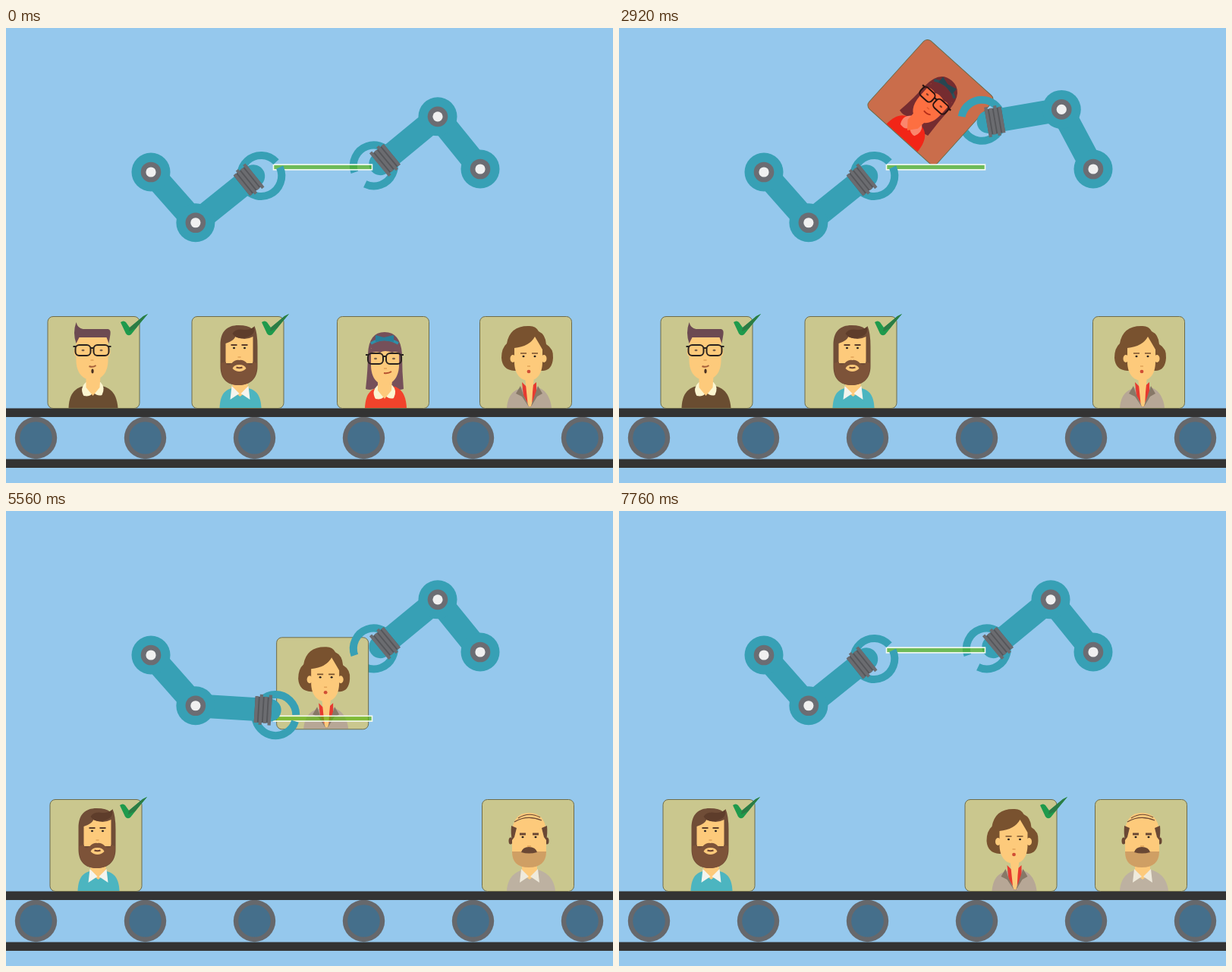
Recreate the animation shown at these times as an HTML page with a canvas. Size 800x600 px, loop 7.92 s.

```html
<!DOCTYPE html>
<html lang="en">
<head>
<meta charset="utf-8">
<title>Sorting belt</title>
<style>
html, body { margin: 0; width: 100%; height: 100%; overflow: hidden; background: #95c8ed; }
canvas { display: block; width: 800px; height: 600px; }
</style>
</head>
<body>
<canvas id="stage" width="800" height="600"></canvas>
<script>
const ctx = document.getElementById('stage').getContext('2d');
const LOOP = 7920, STEP = 40, RAD = Math.PI / 180;
const TEAL = '#37a0b5', SKIN = '#fdca7b', DARK = '#29221f', CREAM = '#fbf5d0';

const lerp = (a, b, p) => a + (b - a) * p;
const clamp = x => Math.max(0, Math.min(1, x));
const span = (t, a, b) => clamp((t - a) / (b - a));
const ease = (t, a, b) => (1 - Math.cos(Math.PI * span(t, a, b))) / 2;
const polar = (o, deg, r) => ({ x: o.x + r * Math.cos(deg * RAD), y: o.y + r * Math.sin(deg * RAD) });

// ---- drawing helpers ----
function fill(color, d) {
  ctx.fillStyle = color;
  ctx.fill(new Path2D(d));
}
function line(color, width, d) {
  ctx.strokeStyle = color;
  ctx.lineWidth = width;
  ctx.stroke(new Path2D(d));
}
function oval(color, x, y, rx, ry = rx) {
  ctx.fillStyle = color;
  ctx.beginPath();
  ctx.ellipse(x, y, rx, ry, 0, 0, 7);
  ctx.fill();
}
function at(x, y, deg, draw) {
  ctx.save();
  ctx.translate(x, y);
  ctx.rotate(deg * RAD);
  draw();
  ctx.restore();
}

// ---- faces, in card coordinates from the top left corner ----
function glasses(x, y) {
  ctx.strokeStyle = DARK;
  ctx.lineWidth = 2;
  for (const dx of [0, 24]) {
    oval('#7a6248', x + dx + 10, y + 7, 2, 1.2);
    ctx.beginPath();
    ctx.roundRect(x + dx, y, 20, 14, 5);
    ctx.stroke();
  }
  line(DARK, 2.2, `M${x + 20} ${y + 4}h4M${x - 3} ${y + 2}h4M${x + 43} ${y + 2}h4`);
}
function eyes(color, l, r, y, w = 2) {
  line(color, w, `M${l - 4} ${y - 3}h8M${r - 4} ${y - 3}h8`);
  oval(DARK, l, y + 1, 1.5, 1.2);
  oval(DARK, r, y + 1, 1.5, 1.2);
}
function collar(color, x, y) {
  fill(SKIN, `M${x - 10} ${y - 8}h20v12l-10 8l-10 -8Z`);
  fill(color, `M${x - 11} ${y - 2}l-2 18l12 -8ZM${x + 11} ${y - 2}l2 18l-12 -8Z`);
}
function roundCollar(x, y) {
  fill(CREAM, `M${x - 9} ${y - 4}q-9 8 -3 18q10 2 12 -5q6 6 12 4q5 -10 -2 -17Z`);
  fill(SKIN, `M${x - 9} ${y - 12}h19l-1 15l-9 11l-9 -11Z`);
}

function spikyMan() {
  fill('#6a4d31', 'M28 121C29 98 40 91 60 91S91 98 93 121Z');
  roundCollar(60, 91);
  oval(SKIN, 38, 47, 3, 6);
  oval(SKIN, 80, 47, 3, 6);
  fill(SKIN, 'M38 24H80V58C80 74 72 84 59 84S38 74 38 58Z');
  fill('#6c4a52', 'M38 8Q40 16 47 17H80Q84 18 83 24L81 36L78 28H42L38 36Q33 22 38 8Z');
  glasses(37, 38);
  line('#e0a257', 1.5, 'M57 58h4');
  line('#a5603a', 2, 'M55 66q5 2 9 -1');
  oval('#4a3021', 59.5, 72.5, 1.6, 3);
}
function beardedMan() {
  fill('#4cb5c0', 'M37 121C38 100 46 94 64 94S91 100 92 121Z');
  collar('#f4f4ee', 64, 94);
  fill('#704d37', 'M38 38C38 20 47 12 62 12Q75 12 80 17L83 13Q87 22 87 40V66C87 82 78 91 62 91S38 82 38 66Z');
  fill(SKIN, 'M45 36Q55 33 58 27Q70 33 81 27V62H45Z');
  fill('#7d5339', 'M39 62L45 60Q47 68 53 62Q58 57 63 58Q68 57 73 62Q79 68 81 60L86 62V66C86 82 77 91 62 91S39 82 39 66Z');
  fill('#5e3d2b', 'M54 23Q58 16 70 18Q78 18 82 14Q85 24 73 28Q60 32 54 23Z');
  eyes('#5e3d2b', 56, 70, 41);
  line('#e0a257', 1.5, 'M61 54h4');
  fill(SKIN, 'M54 69Q56 64 63 64Q70 64 72 69Q68 73 63 73Q58 73 54 69Z');
  line('#6b4030', 2, 'M59 67.5q4 1.5 8 0');
}
function girl() {
  fill('#75505a', 'M38 96Q41 70 41 50Q42 21 63 21Q84 21 86 50Q86 72 88 96Q78 99 72 92H54Q48 99 38 96Z');
  fill('#f2432b', 'M37 121C38 100 46 94 64 92S91 100 92 121Z');
  roundCollar(63, 95);
  fill(SKIN, 'M45 42H82V64C82 80 74 90 63 90S45 80 45 64Z');
  fill('#75505a', 'M43 50Q46 32 63 32Q82 32 84 50Q78 45 73 48Q63 44 57 48Q50 45 43 50Z');
  line('#2f8fa8', 3.5, 'M45 36Q63 25 81 36');
  fill('#277f9a', 'M51 25L62 28L75 25V34L62 32L51 34Z');
  glasses(41, 49);
  line('#e0a257', 1.5, 'M62 69h4');
  line('#b5522f', 1.8, 'M62 75q6 1 10 -2');
}
function bobWoman() {
  fill('#79522f', 'M36 36Q40 13 64 13Q74 12 78 20Q87 24 88 37Q98 43 97 55Q96 71 84 72H46Q30 71 29 55Q29 42 36 36Z');
  fill('#b7a796', 'M36 121C38 100 48 95 65 93S93 102 95 121Z');
  fill('#e63a30', 'M56 87L65 96L75 87V105L66 119L58 105Z');
  fill(SKIN, 'M60 80H72L70 100L69 119H64L62 100Z');
  fill('#877867', 'M54 92L48 102L56 106L66 121L58 104ZM77 92L83 102L76 106L67 121L73 104Z');
  oval(SKIN, 44, 56, 3.5, 5);
  oval(SKIN, 85, 56, 3.5, 5);
  fill(SKIN, 'M46 42Q66 40 73 27Q79 37 83 44V60C83 76 76 85 65 85S46 76 46 60Z');
  eyes('#79522f', 58, 73, 52, 1.7);
  line('#e0a257', 1.5, 'M63 66h4');
  oval('#d04e35', 65, 73, 2.4, 2.2);
}
function baldMan() {
  fill('#bdb1a1', 'M33 121C34 102 46 92 64 92S95 102 97 121Z');
  collar('#efeadc', 63, 94);
  oval('#6a4834', 38, 55, 2.5, 4.5);
  oval('#6a4834', 86, 55, 2.5, 4.5);
  fill(SKIN, 'M40 42Q42 18 62 18Q83 18 85 42V66C85 82 77 90 62 90S40 82 40 66Z');
  fill('#6a4834', 'M39 35L46 38L43 50L40 54Q38 46 39 35ZM86 35L79 38L82 50L85 54Q87 46 86 35Z');
  fill('#cf9f64', 'M40 69H85C85 83 77 90 62 90S40 83 40 69Z');
  line('#6a4834', 1.2, 'M43 30Q60 20 79 28M48 25Q62 16 77 24');
  eyes('#6a4834', 54, 71, 49, 3);
  line('#e0a257', 1.5, 'M60 62h5');
  fill('#6a4834', 'M52 70Q54 63 62 63Q71 63 73 70Q62 73 52 70Z');
}

// ---- stage parts ----
function check(x, y, size = 1) {
  if (!size) return;
  ctx.save();
  ctx.translate(x + 10, y + 20);
  ctx.scale(size, size);
  ctx.translate(-10, -20);
  fill('#1f9a4c', 'M0 10Q4 7 7 10L12 17L30 2L36 -1Q25 12 14 26Q10 29 7 25Z');
  fill('#2c7c45', 'M12 17L30 2L36 -1Q28 8 20 18L11 22Z');
  ctx.restore();
}
// x, y is the card centre
function card(x, y, face, deg = 0, tint = 0) {
  at(x, y, deg, () => {
    ctx.translate(-61, -61);
    ctx.beginPath();
    ctx.roundRect(0.5, 0.5, 121, 121, 7);
    ctx.fillStyle = '#cac78e';
    ctx.fill();
    face();
    ctx.beginPath();
    ctx.roundRect(0.5, 0.5, 121, 121, 7);
    if (tint) {
      ctx.globalCompositeOperation = 'multiply';
      ctx.fillStyle = `rgba(255,140,134,${tint})`;
      ctx.fill();
      ctx.globalCompositeOperation = 'source-over';
    }
    ctx.strokeStyle = '#6d6b4a';
    ctx.lineWidth = 1;
    ctx.stroke();
  });
}
function belt(shift) {
  for (let x = 39.5 - shift % 144; x < 840; x += 144) {
    oval('#66686c', x, 540.5, 27.7);
    oval('#456f8b', x, 540.5, 21.3);
  }
  ctx.fillStyle = '#333';
  ctx.fillRect(0, 501.5, 800, 11.5);
  ctx.fillRect(0, 568.5, 800, 11.5);
}
// The claw sits a little to one side of the forearm axis.
function pose(shoulder, a, b, side) {
  const elbow = polar(shoulder, a, 89);
  const wrist = polar(elbow, b, 89);
  const claw = polar(polar(wrist, b, 17), b + 90, side);
  return { shoulder, elbow, wrist, claw, b };
}
function jaw(arm, gap, side) {
  at(arm.claw.x, arm.claw.y, arm.b, () => {
    ctx.strokeStyle = TEAL;
    ctx.lineWidth = 10;
    ctx.beginPath();
    ctx.arc(0, 0, 27, side * gap * RAD, side * Math.PI, side < 0);
    ctx.stroke();
  });
}
function arm(a) {
  line(TEAL, 31, `M${a.shoulder.x} ${a.shoulder.y}L${a.elbow.x} ${a.elbow.y}L${a.wrist.x} ${a.wrist.y}`);
  for (const j of [a.shoulder, a.elbow]) {
    oval(TEAL, j.x, j.y, 25.5);
    oval('#6b6d73', j.x, j.y, 13.3);
    oval('#f0f0f0', j.x, j.y, 6.6);
  }
  at(a.wrist.x, a.wrist.y, a.b, () => {
    oval(TEAL, 9, 0, 15);
    ctx.fillStyle = '#55565a';
    ctx.fillRect(-11, -17, 22, 34);
    ctx.fillStyle = '#6b6c70';
    for (let i = 0; i < 4; i++) {
      const h = i % 2 ? 20 : 17.5;
      ctx.fillRect(-11 + i * 6, -h, 4.2, 2 * h);
    }
  });
}
function bar(y) {
  ctx.fillStyle = 'rgba(90,180,10,.65)';
  ctx.fillRect(353, y - 3, 129, 6);
  ctx.strokeStyle = '#f6fbf0';
  ctx.lineWidth = 1.6;
  ctx.strokeRect(352.5, y - 3.4, 130, 6.8);
}

// ---- motion ----
const RIGHT = { x: 625, y: 186 }, LEFT = { x: 191, y: 190 };
const HOME = [231, 140.5], DOWN = [125, 120], FLING = [246.4, 182];
const HELD = { x: -67.7, y: 45.9 };
const MOVES = [
  [40, 780, DOWN], [820, 1480, HOME],
  [2480, 3000, FLING, true], [3000, 3600, HOME],
  [3600, 4276, DOWN], [4280, 4903, HOME],
  [6350, 7050, DOWN], [7080, 7700, HOME]
];
const rightPose = (a, b) => pose(RIGHT, a, b, 3.7);
function rightArm(t) {
  let [a, b] = HOME;
  for (const [from, to, goal, push] of MOVES) {
    if (t < from) break;
    const p = push ? span(t, from, to) ** 2 : ease(t, from, to);
    a = lerp(a, goal[0], p);
    b = lerp(b, goal[1], p);
  }
  return rightPose(a, b);
}
const LOW = rightPose(...DOWN).claw;

// Card carried by the claw: p is 0 on the belt at x and 1 at the scanner.
function carried(claw, x, p) {
  return {
    x: claw.x + lerp(x - LOW.x, HELD.x, p),
    y: claw.y + lerp(441 - LOW.y, HELD.y, p),
    deg: 4 * Math.sin(Math.PI * p)
  };
}
const sweep = (t, start) => ease(t, start, start + 400) - ease(t, start + 400, start + 790);

function girlCard(t, claw) {
  if (t > 3320) return;
  const tint = span(t, 1860, 1980);
  if (t < 2480) {
    const c = t < 820 ? { x: 497, y: 441, deg: 0 } : carried(claw, 497, ease(t, 820, 1480));
    card(c.x, c.y, girl, c.deg, tint);
  } else {
    const k = ((t - 2480) / 440) ** 2;
    card(417.5 - 7 * k, 227 - 129 * k, girl, 42 * k, 1);
  }
}
function womanCard(t, claw, shift) {
  let c = { x: 685 - shift, y: 441, deg: 0 };
  if (t >= 7050) c = { x: 516.5, y: 441, deg: 0 };
  else if (t >= 6350) c = carried(claw, 516.5, 1 - ease(t, 6350, 7050));
  else if (t >= 4280) c = carried(claw, 498, ease(t, 4280, 4903));
  card(c.x, c.y, bobWoman, c.deg);
  check(555, 378, ease(t, 7120, 7320));
}

function draw(t) {
  ctx.fillStyle = '#95c8ed';
  ctx.fillRect(0, 0, 800, 600);

  const shift = 187 * ease(t, 3840, 4274);
  belt(288 * ease(t, 3860, 4292));
  card(115.5 - shift, 441, spikyMan);
  check(151 - shift, 378);
  card(305.5 - shift, 441, beardedMan);
  check(337 - shift, 378);
  card(875 - shift, 441, baldMan);

  const right = rightArm(t);
  jaw(right, 25, -1);
  girlCard(t, right.claw);
  womanCard(t, right.claw, shift);
  jaw(right, 20, 1);
  arm(right);

  const scan = sweep(t, 1500) + sweep(t, 5200);
  bar(183.5 + 92.5 * scan);
  const left = pose(LEFT, 48.6, lerp(-38.8, 4.5, scan), 6);
  jaw(left, 4, -1);
  jaw(left, 14, 1);
  arm(left);
}

const start = performance.now();
function tick() {
  const t = (performance.now() - start) % LOOP;
  draw(Math.min(Math.floor(t / STEP) * STEP, 7760));
  requestAnimationFrame(tick);
}
tick();
</script>
</body>
</html>
```
